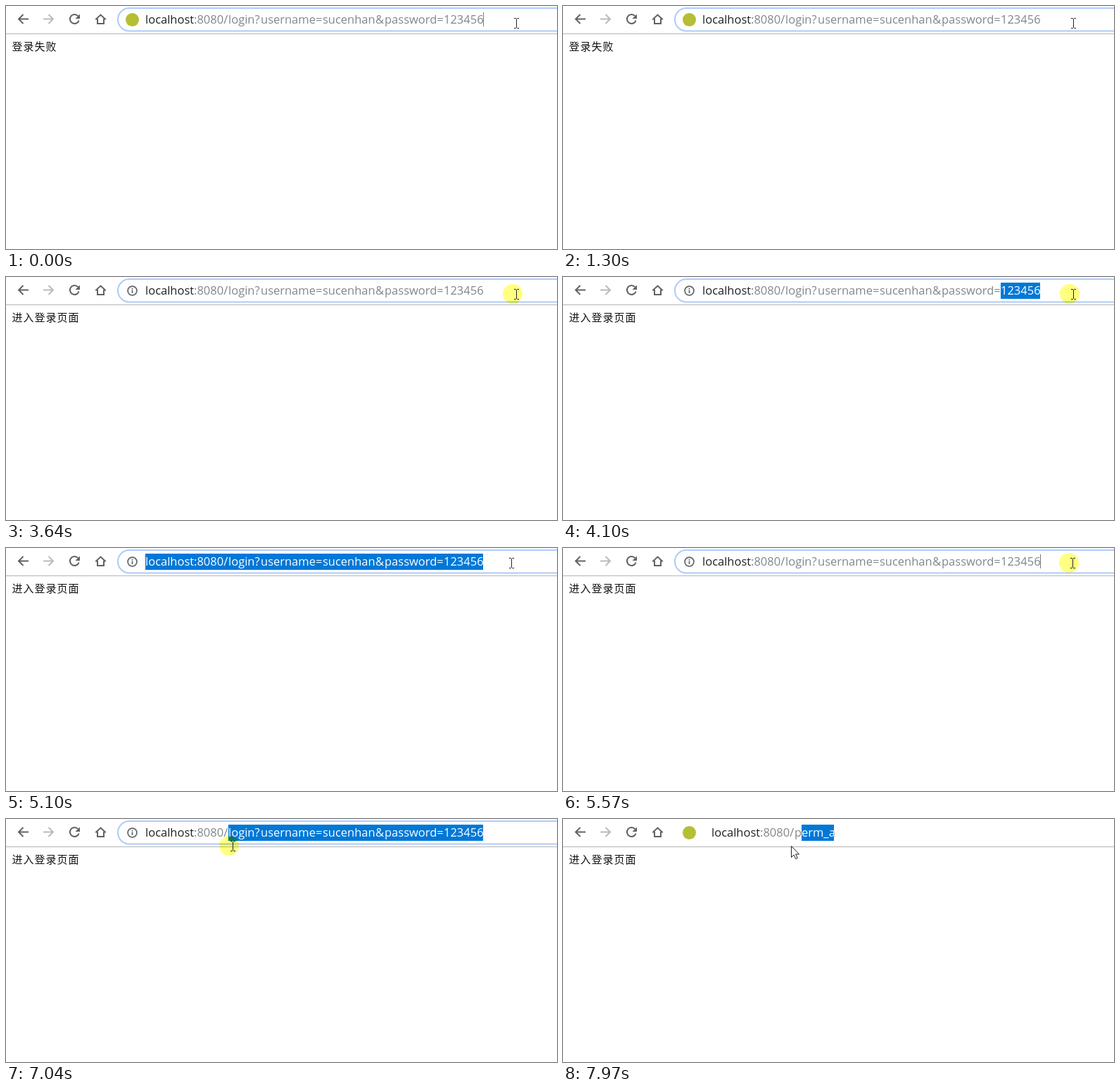
Animation of 783x345 px, one loop 8000 ms. Source, as an HTML page:

```html
<!DOCTYPE html>
<html lang="zh-CN">
<head>
<meta charset="utf-8">
<title>Login page</title>
<style>
  html, body { margin: 0; width: 100%; height: 100%; overflow: hidden; background: #fff; }
  svg { display: block; width: 783px; height: 345px; background: #fff; isolation: isolate; }
  .url { font: 16.5px "Open Sans", "Noto Sans", sans-serif; fill: #80868b; white-space: pre; }
  .url .host { fill: #202124; }
  .url.selected, .url.selected .host { fill: #fff; }
  .page { font: 300 15px "Noto Sans CJK SC", "Noto Sans CJK", sans-serif; letter-spacing: 1px; fill: #111; }
  .icon { fill: none; stroke: #5f6368; stroke-width: 2; }
  #pill { fill: #f1f3f4; stroke: #f1f3f4; stroke-width: 1; }
  #pill.focused { fill: #fff; stroke: #aecbfa; stroke-width: 2; }
  #halo { fill: #ffff80; mix-blend-mode: multiply; }
</style>
</head>
<body>
<svg viewBox="0 0 783 345">
  <g class="icon">
    <path d="M32 18.5H18M24.5 12L18 18.5L24.5 25"/>
    <path d="M53 18.5H67M60.5 12L67 18.5L60.5 25" stroke="#b9bbc4"/>
    <g id="reload">
      <path d="M102.3 14.2A6.5 6.5 0 1 0 103.6 20.5"/>
      <path d="M105 11.5V18H98.5Z" fill="#5f6368" stroke="none"/>
    </g>
    <path id="stop" d="M92 13.5L103 24.5M103 13.5L92 24.5"/>
    <path d="M127.3 19.3L134.5 12.6L141.7 19.3M130 18V25H139V18"/>
  </g>
  <path d="M0 39.5H783" stroke="#b5b5b7"/>
  <rect id="pill" x="159" y="3" width="660" height="32.5" rx="16.2"/>
  <circle id="badge" cx="179.5" cy="19.5" r="9.5" fill="#b4bf35"/>
  <g id="info" class="icon">
    <circle cx="179.5" cy="19.5" r="6.4" stroke-width="1.7"/>
    <path d="M179.5 18.5V23M179.5 15.7V17.4" stroke-width="1.7"/>
  </g>
  <g id="urls"></g>
  <path id="caret" d="M678.5 9V29" stroke="#777"/>
  <text id="message" class="page" x="8.5" y="63"></text>
  <circle id="halo" r="14" cx="-5" cy="-1"/>
  <path id="beam" d="M-3.5 -7H-1L0 -6L1 -7H3.5M0 -6V6M-3.5 7H-1L0 6L1 7H3.5" fill="none" stroke="#222"/>
  <path id="arrow" d="M.5 .5V16.5L4 13L6.8 18.7L9.3 17.5L6.6 12H11.5Z" fill="#fff" stroke="#222"/>
</svg>
<script>
const LOOP = 8000;
const $ = id => document.getElementById(id);
const show = (node, visible) => { node.style.display = visible ? "" : "none"; };
const move = (node, x, y) => node.setAttribute("transform", `translate(${x} ${y})`);
const between = (t, from, to) => t >= from && t < to;

function make(tag, attrs, parent) {
  const node = document.createElementNS("http://www.w3.org/2000/svg", tag);
  for (const key in attrs) node.setAttribute(key, attrs[key]);
  return parent.appendChild(node);
}

// Draws an address from [x, text] parts; select(x) marks it from the character at x to the end.
function makeUrl(name, end, parts) {
  const group = make("g", {}, $("urls"));
  const addText = className => {
    const text = make("text", { class: className, y: 25 }, group);
    parts.forEach(([x, part], i) => {
      make("tspan", { x, class: i ? "" : "host" }, text).textContent = part;
    });
    return text;
  };
  const base = addText("url");
  const box = make("rect", { y: 8, height: 23, fill: "#0078d7" }, group);
  const clip = make("clipPath", { id: name }, group);
  const clipBox = make("rect", { y: 8, height: 23 }, clip);
  addText("url selected").setAttribute("clip-path", `url(#${name})`);

  const edges = Array.from({ length: base.getNumberOfChars() }, (_, i) => base.getStartPositionOfChar(i).x);
  const select = x => {
    const from = x >= end ? end : Math.round(edges.findLast(edge => edge <= x));
    for (const rect of [box, clipBox]) {
      rect.setAttribute("x", from);
      rect.setAttribute("width", end - from);
    }
  };
  return { group, select };
}

const START = 198, PASSWORD = 622, END = 678;
const login = makeUrl("loginClip", END, [
  [START, "localhost"], [267, ":8080/"], [316, "login?"], [362, "username="],
  [450, "sucenhan"], [525, "&"], [538, "password="], [PASSWORD, "123456"]
]);
const perm = makeUrl("permClip", 385, [[211, "localhost"], [280, ":8080/"], [329, "p"], [339, "erm_a"]]);
perm.select(339);

const DRAG_START = 5570, DRAG_END = 7440;
const clicks = [[3640, 3720], [4100, 4330], [4560, 4880], [5190, 5340], [DRAG_START, DRAG_END]];
// time, x, y
const rests = [[0, 725, 25], [4180, 724, 22], [4960, 718, 22], [5420, 724, 22],
  [7040, 322, 39], [7130, 326, 39], [DRAG_END, 324, 38]];

// The drag slows down as it goes left and is seen in steps of 78 ms.
function pointerAt(t) {
  if (between(t, DRAG_START, 7040)) {
    const step = Math.min(14, Math.floor((t - DRAG_START + 10) / 78));
    const decay = Math.exp(-step * 78 / 440);
    return [280 + 444 * decay, 39 - 17 * decay];
  }
  return rests.findLast(rest => rest[0] <= t).slice(1);
}

function selectionAt(t, x) {
  if (t >= DRAG_START) return t < DRAG_END ? x - 6 : 316;
  if (t < 3720 || t >= 5190) return END;
  return between(t, 4100, 4560) ? PASSWORD : START;
}

function render(t) {
  const [x, y] = pointerAt(t);
  const typed = t >= 7970;
  const loading = between(t, 1700, 2240);
  const leaf = t < 1700 || typed;
  const arrow = t >= DRAG_END;

  show($("reload"), !loading);
  show($("stop"), loading);
  show($("badge"), leaf);
  show($("info"), !leaf);
  show($("pill"), !typed);
  $("pill").classList.toggle("focused", !between(t, 1700, 3640));

  show(login.group, !typed);
  show(perm.group, typed);
  login.select(selectionAt(t, x));
  show($("caret"), t < 290 || between(t, 840, 1300) || between(t, 5190, 5650));
  $("message").textContent = t < 2160 ? "登录失败" : "进入登录页面";

  show($("halo"), clicks.some(([from, to]) => between(t, from, to)));
  show($("beam"), !arrow);
  show($("arrow"), arrow);
  move($("halo"), x, y);
  move($("beam"), x + 0.5, y - 0.5);
  move($("arrow"), x, y);
}

const start = performance.now();
function tick() {
  render((performance.now() - start) % LOOP);
  requestAnimationFrame(tick);
}
tick();
</script>
</body>
</html>
```
